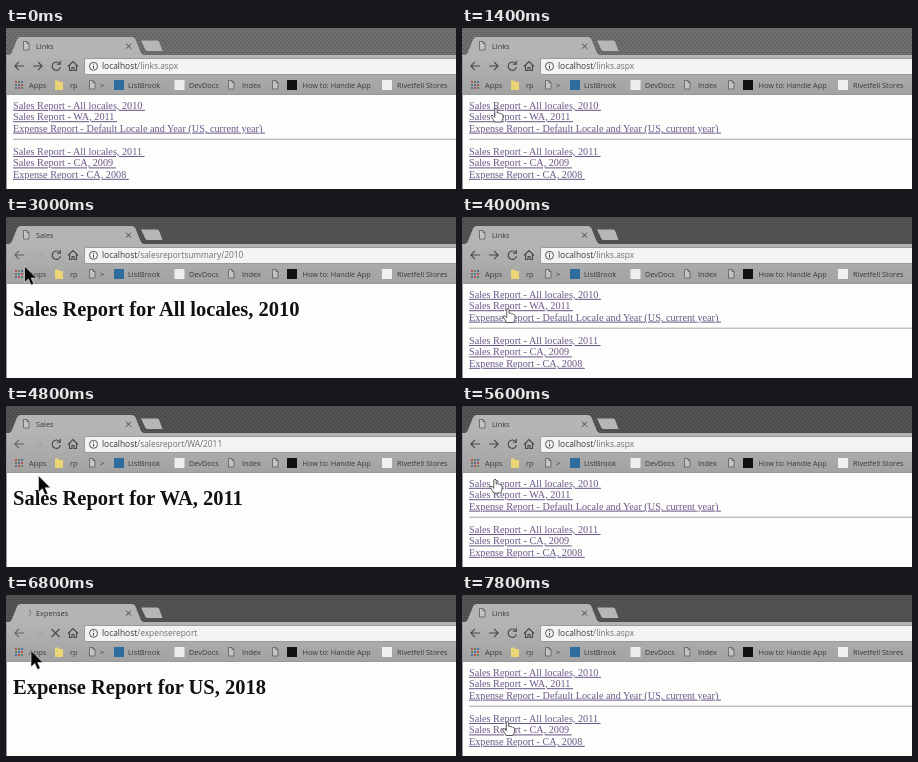
An HTML page for the animation above (8000 ms loop, 450 px wide and 161 px high).

```html
<!DOCTYPE html>
<html lang="en">
<head>
<meta charset="utf-8">
<title>Links</title>
<style>
html, body { margin: 0; width: 100%; height: 100%; overflow: hidden; background: #fdfdfc; }
svg { display: block; width: 100%; height: 100%; }
text { white-space: pre; }
.ui { font: 7.35px "Open Sans", "Noto Sans", sans-serif; fill: #383838; }
.url { font-size: 8.4px; }
.link { font: 10.22px "Liberation Serif", serif; fill: #6a5888; text-decoration: underline; }
.head { font: bold 20.5px "Liberation Serif", serif; fill: #111; }
.icon { fill: none; stroke: #484848; stroke-width: 1.1; }
.doc { fill: #c4c4c4; stroke: #5c5c5c; stroke-width: .8; }
</style>
</head>
<body>
<svg viewBox="0 0 450 161" preserveAspectRatio="none">
  <defs>
    <pattern id="weave" width="4" height="4" patternUnits="userSpaceOnUse">
      <path d="M0 .5H2M2 2.5H4" stroke="#000" stroke-opacity=".1"/>
      <path d="M2 1.5H4M0 3.5H2" stroke="#fff" stroke-opacity=".05"/>
    </pattern>
    <linearGradient id="bar" x2="0" y2="1">
      <stop offset="0" stop-color="#b4b4b4"/>
      <stop offset="1" stop-color="#a2a2a2"/>
    </linearGradient>
    <path id="doc" class="doc" d="M.5 .5H4L6 2.6V9H.5ZM4 .5V2.6H6"/>
  </defs>

  <rect id="frame" width="450" height="28"/>
  <rect width="450" height="28" fill="url(#weave)"/>
  <path d="M135 12.500H151Q152.500 12.500 153 13.500L156.500 23H141.500Q140 23 139.300 21.500Z" fill="#b6b6b6"/>
  <rect y="27" width="450" height="40" fill="url(#bar)"/>
  <path d="M2 27.500Q5 27 6 24L11 11.500Q12 9 14.500 9H126Q128.500 9 129.500 11.500L134.500 24Q135.500 27 138.500 27.500Z" fill="#b4b4b4"/>
  <use id="tabDoc" href="#doc" x="17" y="13"/>
  <path id="spinner" class="icon" d="M23 14.500A4 4 0 0 1 23 21" opacity=".4"/>
  <text id="tab" class="ui" x="30" y="20.700"></text>
  <path class="icon" d="M120 15.700L125 20.700M125 15.700L120 20.700" style="stroke-width:1"/>

  <path id="back" class="icon" d="M18 38H9M13 33.800L8.800 38L13 42.200"/>
  <path id="next" class="icon" d="M27 38H36M32 33.800L36.200 38L32 42.200"/>
  <path id="reload" class="icon" d="M53.600 35.500A4.200 4.200 0 1 0 54.500 39M54.300 32.800V36.200H50.900"/>
  <path id="stop" class="icon" d="M45.500 34L53.500 42M53.500 34L45.500 42"/>
  <path class="icon" d="M62 38.500L67 33.500L72 38.500M63.500 37.500V42.500H66V39.500H68V42.500H70.500V37.500"/>
  <rect x="78.500" y="30.500" width="380" height="16" rx="2" fill="#f3f3f3" stroke="#8d8d8d" stroke-width=".8"/>
  <circle class="icon" cx="87.500" cy="38.300" r="4" style="stroke-width:.9"/>
  <path class="icon" d="M87.500 37.700V40.600M87.500 35.700V36.700" style="stroke-width:1"/>
  <text class="ui url" x="96" y="41.300">localhost<tspan id="path" fill="#707070"></tspan></text>
  <g id="marks"></g>

  <rect y="66.500" width="450" height="95" fill="#fdfdfc"/>
  <path d="M0 66.500H450" stroke="#8c8c8c" stroke-width=".8"/>
  <g id="links"><path d="M7 111.200H450" stroke="#a5a5a5"/></g>
  <text id="head" class="head" x="7" y="98.600"></text>
  <path d="M.5 28V161" stroke="#999"/>

  <path id="arrow" d="M0 0V16.500L3.800 13L6.500 19L9.300 17.800L6.700 12H12Z" fill="#080808" stroke="#eee" stroke-width=".6"/>
  <path id="hand" d="M-1.200 1Q0 -.8 1.200 1V5Q2.500 4 3.300 5.400Q4.600 4.500 5.300 6Q6.900 5.600 7 7.300V10Q6.800 12 5.400 14H-1.400Q-2.500 11.500 -5 8.300Q-4.700 6.300 -2.800 7.800L-1.200 9.300Z" fill="#fff" stroke="#4a4a4a" stroke-width=".9" stroke-linejoin="round"/>
</svg>
<script>
const LOOP = 8000, STEP = 200;
const $ = id => document.getElementById(id);

function add(parent, tag, attrs, text) {
  const el = document.createElementNS("http://www.w3.org/2000/svg", tag);
  for (const k in attrs) el.setAttribute(k, attrs[k]);
  if (text) el.textContent = text;
  return parent.appendChild(el);
}

const marks = $("marks");
const label = (x, s) => add(marks, "text", { class: "ui", x, y: 59.8 }, s);
const square = (x, fill) => add(marks, "rect", { x, y: 52, width: 10, height: 10, fill });
const dots = ["#b5524a", "#667f5d", "#506f9c"];
for (let i = 0; i < 9; i++) {
  const col = i % 3, row = i / 3 | 0;
  add(marks, "rect", { x: 9 + col * 3, y: 53 + row * 3, width: 2, height: 2, fill: dots[(col + row) % 3] });
}
add(marks, "path", { d: "M49 52.500H52.500L53.500 54H57V62H49Z", fill: "#ecd574" });
for (const x of [83, 222, 266]) add(marks, "use", { href: "#doc", x, y: 52 });
square(108, "#2d6d9e");
square(168.500, "#eeeeee");
square(281, "#111111");
square(376, "#f0f0f0");
label(23, "Apps");
label(64, "rp");
label(94, ">");
label(122, "ListBrook");
label(183, "DevDocs");
label(236, "Index");
label(296.5, "How to: Handle App");
label(391, "Rivetfell Stores");

[
  "Sales Report - All locales, 2010",
  "Sales Report - WA, 2011",
  "Expense Report - Default Locale and Year (US, current year)",
  "Sales Report - All locales, 2011",
  "Sales Report - CA, 2009",
  "Expense Report - CA, 2008"
].forEach((s, i) => {
  const y = (i < 3 ? 80.8 : 127) + i % 3 * 11.4;
  add($("links"), "text", { class: "link", x: 7, y }, s + "\u00a0");
});

const home = { tab: "Links", path: "/links.aspx", head: "" };
const summary = { tab: "Sales", path: "/salesreportsummary/2010", head: "Sales Report for All locales, 2010" };
const sales = { tab: "Sales", path: "/salesreport/WA/2011", head: "Sales Report for WA, 2011" };
const expense = { tab: "Expenses", path: "/expensereport", head: "Expense Report for US, 2018" };
const visits = [
  [0, home], [2000, summary], [3400, home], [4400, sales],
  [5400, home], [6400, expense], [7200, home]
];

// Pointer stops: time, x, y
const stops = [
  [600, 92, 142], [1000, 46, 94], [1200, 34, 80], [2200, 34, 80],
  [2800, 25, 63], [3000, 18.5, 49], [3200, 14, 38], [3400, 14, 38],
  [3800, 38, 84], [4000, 46, 91.5], [4600, 46, 91.5], [5000, 19, 48],
  [5200, 14, 38], [5400, 19, 52], [5600, 33, 73], [6000, 47, 98],
  [6400, 47, 98], [6800, 25, 55.5], [7000, 15, 38], [7200, 15, 38],
  [7600, 40, 112], [7800, 45.5, 126.5]
];

function pointer(t) {
  const i = stops.findIndex(s => s[0] > t);
  if (i < 0) return stops[stops.length - 1].slice(1);
  if (!i) return null;
  const [a, ax, ay] = stops[i - 1], [b, bx, by] = stops[i];
  const k = (t - a) / (b - a);
  return [ax + (bx - ax) * k, ay + (by - ay) * k];
}

const show = (id, on) => $(id).setAttribute("visibility", on ? "visible" : "hidden");

function draw(t) {
  const page = visits.filter(v => v[0] <= t).pop()[1];
  const atHome = page === home;
  const busy = page === expense && t < 7000;

  $("frame").setAttribute("fill", t < 2000 ? "#6c6c6c" : "#505050");
  $("tab").textContent = page.tab;
  $("path").textContent = page.path;
  $("head").textContent = page.head;
  $("back").setAttribute("opacity", atHome ? 1 : .75);
  $("next").setAttribute("opacity", atHome ? 1 : .08);
  show("links", atHome);
  show("tabDoc", !busy);
  show("spinner", busy);
  show("reload", !busy);
  show("stop", busy);

  const p = pointer(t);
  const onLink = p && atHome && p[1] > 72;
  show("hand", onLink);
  show("arrow", p && !onLink);
  if (p) $(onLink ? "hand" : "arrow").setAttribute("transform", `translate(${p})`);
}

const start = performance.now();
function tick() {
  const t = (performance.now() - start) % LOOP;
  draw(Math.floor(t / STEP) * STEP);
  requestAnimationFrame(tick);
}
tick();
</script>
</body>
</html>
```
